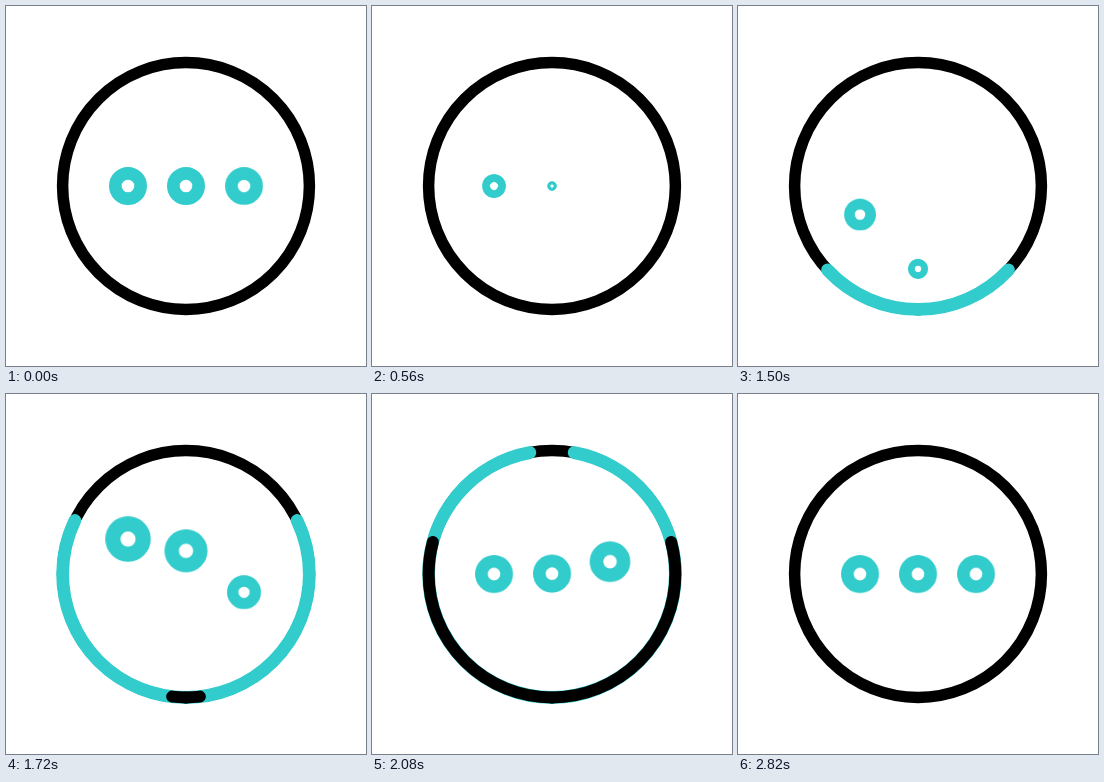
An HTML page that plays this animation: 360x360 px, repeating every 3600 ms.

```html
<!DOCTYPE html>
<html lang="en">
<head>
<meta charset="utf-8">
<title>Bouncing dots</title>
<style>
  html, body { margin: 0; width: 100%; height: 100%; overflow: hidden; background: #fff; }
  svg { display: block; width: 100%; height: 100%; }
  .ring { fill: none; stroke: #000; stroke-width: 11.5; }
  .sweep { fill: none; stroke-linecap: round; stroke-dasharray: 180 400; opacity: 0; }
  .teal { stroke: #33cccc; stroke-width: 12.8; }
  .black { stroke: #000; stroke-width: 12; }
  .dot { fill: none; stroke: #33cccc; stroke-width: 12.7; }
</style>
</head>
<body>
<svg viewBox="0 0 360 360">
  <clipPath id="inside"><circle cx="180" cy="180" r="123"/></clipPath>
  <g id="dots" clip-path="url(#inside)"></g>
  <circle class="ring" cx="180" cy="180" r="123.4"/>
  <g id="sweeps"></g>
</svg>
<script>
const LOOP = 3600;
const SMOOTH = 'cubic-bezier(.333,0,.667,1)';
const SHRINK = 'cubic-bezier(.77,0,.67,1)';
const SWEEP = 'cubic-bezier(.333,0,.29,1)';
const HOLD = 'steps(1,end)';

function add(parent, tag, attrs) {
  const el = document.createElementNS('http://www.w3.org/2000/svg', tag);
  for (const name in attrs) el.setAttribute(name, attrs[name]);
  return document.getElementById(parent).appendChild(el);
}

// steps: [time in ms, value, easing towards the next step]
function play(el, prop, steps) {
  const frames = steps.map(([ms, value, easing = 'linear']) =>
    ({ offset: ms / LOOP, [prop]: value, easing }));
  const anim = el.animate(frames, { duration: LOOP, iterations: Infinity });
  anim.startTime = document.timeline.currentTime === null ? null : start;
}

const start = document.timeline.currentTime;

// Dots shrink from right to left, then jump back in from left to right.
[122, 180, 238].forEach((x, i) => {
  const out = 200 - i * 100;
  const jump = 1200 + i * 100;
  const pose = (y, k) => `translate(${x}px, ${y}px) scale(${k})`;
  const dot = add('dots', 'circle', { class: 'dot', r: 12.65 });
  play(dot, 'transform', [
    [0, pose(180, 1)],
    [out, pose(180, 1), SHRINK],
    [out + 600, pose(180, 0), HOLD],
    [jump, pose(328, 0.153), SMOOTH],
    [jump + 500, pose(144.5, 1.203), SMOOTH],
    [jump + 800, pose(180, 1)],
    [LOOP, pose(180, 1)]
  ]);
});

// Each sweep climbs both sides of the ring from the bottom.
[['teal', 1200], ['black', 1600]].forEach(([look, begin]) => {
  for (const side of [0, 1]) {
    const half = add('sweeps', 'path', {
      class: 'sweep ' + look,
      pathLength: 180,
      d: `M180 303.4A123.4 123.4 0 0 ${side} 180 56.6`
    });
    play(half, 'strokeDashoffset', [
      [0, '180'], [begin, '180', SWEEP], [begin + 1200, '0'], [LOOP, '0']
    ]);
    play(half, 'opacity', [
      [0, 0, HOLD], [begin + 10, 1, HOLD], [2815, 0, HOLD], [LOOP, 0]
    ]);
  }
});
</script>
</body>
</html>
```
